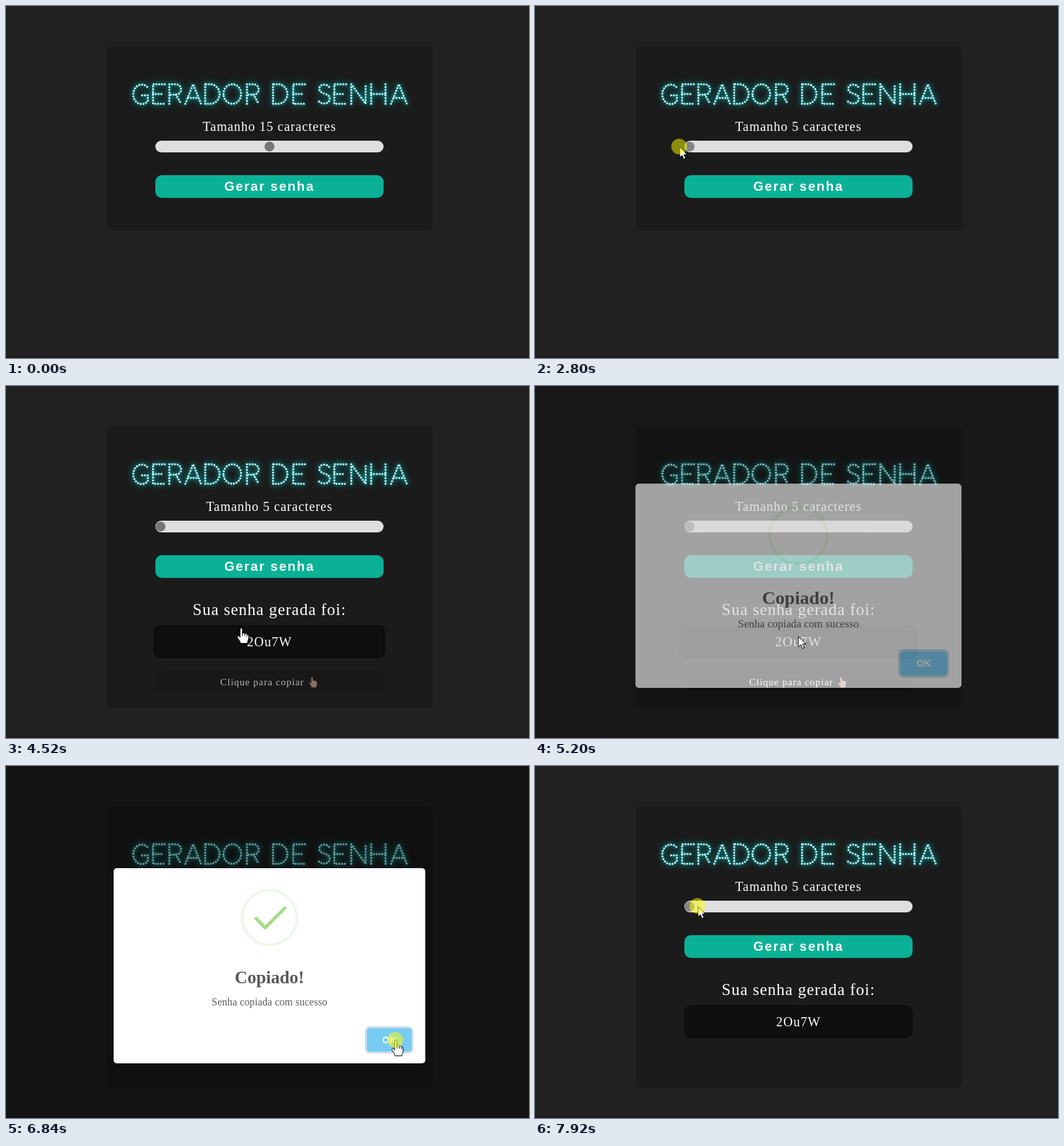
Animation, 802 px wide and 541 px high, one loop 8 s. Source, as an HTML page:

```html
<!DOCTYPE html>
<html lang="pt-BR">
<head>
<meta charset="utf-8">
<title>Gerador de senha</title>
<style>
html, body { margin: 0; width: 100%; height: 100%; overflow: hidden; background: #212121; }
svg { display: block; width: 100%; height: 100%; }
text { font-family: "Liberation Serif", "Times New Roman", serif; fill: #fff; }
.mid { text-anchor: middle; }
.ls { letter-spacing: 1px; }
.sans { font-family: "Liberation Sans", Arial, sans-serif; font-weight: bold; }
#title {
  fill: none; stroke: #d6f3f4; stroke-width: 3.1; stroke-linecap: round; stroke-dasharray: 0 4.28;
  filter: drop-shadow(0 0 1.5px #0aa) drop-shadow(0 0 4px #0aa);
}
.cursor { fill: #fff; stroke: #000; stroke-width: 1; stroke-linejoin: round; }
</style>
</head>
<body>
<svg viewBox="0 0 802 541">
  <defs>
    <path id="handShape" d="M-2 2C-2-.7 1.6-.7 1.6 2V8.5C2.5 7 5 7.3 5.2 9C6.5 7.8 8.5 8.4 8.6 10C10 9.2 11 10 11 11.5V16C11 19 9 20 9 23.5H-1.5C-1.5 20.5-4 18.5-6 14.5C-7 12-4.5 11-3.3 12.8L-2 14.5Z"/>
  </defs>

  <rect width="802" height="541" fill="#212121"/>
  <rect y="539" width="802" height="2" fill="#1c1c1c"/>
  <rect id="panel" x="154" y="62" width="500" height="283" rx="5" fill="#1b1b1b"/>
  <g id="title" role="img" aria-label="Gerador de senha"></g>
  <text id="size" class="mid ls" x="404" y="192" font-size="20"></text>
  <rect x="229" y="207" width="350" height="18" rx="9" fill="#dedede"/>
  <circle id="thumb" cy="216" r="7.6" fill="#767676"/>
  <rect x="229" y="260" width="350" height="35" rx="10" fill="#0bb196"/>
  <text class="mid sans" x="404" y="284" font-size="20" letter-spacing="2">Gerar senha</text>

  <g id="result">
    <text class="mid ls" x="404" y="352" font-size="25">Sua senha gerada foi:</text>
    <g id="box">
      <rect x="230" y="369" width="348" height="48" rx="9" fill="#0f0f0f" stroke="#0a0a0a" stroke-width="2"/>
      <text class="mid ls" x="404" y="400" font-size="20">2Ou7W</text>
    </g>
  </g>
  <rect id="tipBox" x="229" y="438" width="350" height="32" rx="9" fill="#161616"/>

  <rect id="shade" width="802" height="541" fill="#000"/>
  <g id="tip">
    <text class="ls" x="328.5" y="460" font-size="15">Clique para copiar</text>
    <use href="#handShape" transform="translate(469.5 447.5) scale(.67)" fill="#bd967f"/>
  </g>

  <g id="modal">
    <rect x="165" y="157" width="478" height="300" rx="5" fill="#fff"/>
    <g transform="translate(364 193)">
      <circle cx="40" cy="40" r="42" fill="none" stroke="#a5dc86" stroke-width="4"/>
      <path d="M0-60A60 60 0 0 0 0 60Z" transform="translate(27 53) rotate(-45)" fill="#fff"/>
      <path id="cover" d="M0-60A60 60 0 0 1 0 60Z" fill="#fff"/>
      <rect x="28" y="8" width="7" height="92" transform="rotate(-45 31.5 54)" fill="#fff"/>
      <circle cx="40" cy="40" r="42" fill="none" stroke="#a5dc86" stroke-opacity=".2" stroke-width="4"/>
      <rect id="tickShort" height="5" rx="2" fill="#a5dc86"/>
      <rect id="tickLong" height="5" rx="2" fill="#a5dc86"/>
    </g>
    <text class="mid" x="404" y="334" font-size="27" font-weight="bold" style="fill:rgba(0,0,0,.65)">Copiado!</text>
    <text class="mid" x="404" y="368" font-size="16" style="fill:rgba(0,0,0,.64)">Senha copiada com sucesso</text>
    <rect x="551.5" y="401.5" width="72" height="39" rx="6.5" fill="none" stroke="#2b72a5" stroke-opacity=".32" stroke-width="2"/>
    <rect id="ok" x="553" y="403" width="69" height="36" rx="5"/>
    <text class="mid sans" x="587.5" y="426" font-size="14">OK</text>
  </g>

  <g id="pointer">
    <path id="arrow" class="cursor" d="M0 0V16L3.7 12.6L6.2 18.5L9 17.3L6.5 11.5H11.3Z"/>
    <g id="hand" class="cursor">
      <use href="#handShape"/>
      <path d="M1.6 8V12M5.2 9V12.5M8.6 10V13" fill="none"/>
    </g>
    <circle id="press" cx="-1" cy="-1" r="12" fill="#ff0" fill-opacity=".5"/>
  </g>
</svg>

<script>
const LOOP = 8000;
const $ = id => document.getElementById(id);
const set = (id, attrs) => {
  for (const k in attrs) $(id).setAttribute(k, attrs[k]);
};
const show = (id, on) => set(id, { visibility: on ? 'visible' : 'hidden' });
const clamp = (v, a = 0, b = 1) => Math.min(b, Math.max(a, v));
const within = (t, a, b) => t >= a && t < b;

// CSS cubic-bezier easing, solved by bisection
function bezier(x1, y1, x2, y2) {
  const at = (a, b, u) => 3 * a * u * (1 - u) ** 2 + 3 * b * u * u * (1 - u) + u ** 3;
  return x => {
    if (x <= 0 || x >= 1) return clamp(x);
    let lo = 0, hi = 1;
    for (let i = 0; i < 24; i++) {
      const m = (lo + hi) / 2;
      if (at(x1, x2, m) < x) lo = m; else hi = m;
    }
    return at(y1, y2, lo);
  };
}
const ease = bezier(.25, .1, .25, 1);
const easeIn = bezier(.42, 0, 1, 1);
const easeInOut = bezier(.42, 0, .58, 1);
const fade = (t, start, dur) => ease((t - start) / dur);

// Keyframes are [position, ...values]
function track(keys, p, easing) {
  if (p <= keys[0][0]) return keys[0].slice(1);
  for (let i = 1; i < keys.length; i++) {
    const a = keys[i - 1], b = keys[i];
    if (p < b[0]) {
      const k = easing((p - a[0]) / (b[0] - a[0]));
      return a.slice(1).map((v, j) => v + (b[j + 1] - v) * k);
    }
  }
  return keys[keys.length - 1].slice(1);
}

const GLYPHS = {
  G: 'M22 4A13 15 0 1 0 23 26V17H13',
  E: 'M18 0H0V30H18M0 15H15',
  R: 'M0 30V0H10A8 8 0 0 1 10 16H0M10 16L18 30',
  A: 'M0 30L12 0L24 30M4 21H20',
  D: 'M0 0V30H8A14 15 0 0 0 8 0H0',
  O: 'M0 15A13.5 15 0 1 1 27 15A13.5 15 0 1 1 0 15',
  S: 'M17 4C13-1 2-1 2 7C2 16 18 13 18 22C18 31 5 32 0 25',
  N: 'M0 30V0L22 30V0',
  H: 'M0 0V30M22 0V30M0 15H22'
};
const STARTS = [194.5, 225.5, 250.5, 275, 305.5, 333.5, 369.5, 409.5, 440.5, 478.5, 503.5, 529.5, 560, 590.5];
$('title').innerHTML = [...'GERADORDESENHA'].map((c, i) =>
  `<path d="${GLYPHS[c]}" transform="translate(${STARTS[i]} 120.2)"/>`).join('');

const PATH = [
  [680, 770, 321], [1120, 435, 277], [1280, 435, 277], [1440, 402, 271], [1640, 402, 271],
  [2120, 404, 212], [2320, 404, 214], [2760, 222, 217], [2880, 222, 217], [3120, 330, 267],
  [3200, 350, 273], [3360, 390, 281], [4000, 390, 281], [4300, 340, 335], [4520, 361, 372],
  [4800, 404, 385], [5920, 404, 385], [6600, 598, 422], [7000, 598, 422], [7640, 243, 213],
  [7800, 243, 213], [7920, 250, 216]
];
const PRESSES = [[2280, 2880], [3400, 3520], [5060, 5160], [6800, 6960], [7840, LOOP]];
const OPEN = 5080, CLOSE = 6920, REVEAL = 3440;
const POP = [[0, 1], [.01, .5], [.45, 1.05], [.8, .95], [1, 1]];
const SPIN = [[.05, -45], [.12, -405]];
// width, left, top
const SHORT = [[.54, 0, 1, 19], [.7, 50, -8, 37], [.84, 17, 21, 48], [1, 25, 14, 46]];
const LONG = [[.65, 0, 34, 54], [.84, 55, 25, 35], [1, 47, 25, 38]];

function drawTick(id, keys, p, angle) {
  const [w, x, y] = track(keys, p, ease);
  set(id, { width: w, x, y, transform: `rotate(${angle} ${x + w / 2} ${y + 2.5})` });
}

function drawSlider(t, x) {
  const value = t < 2320 ? 15 : t < 2800 ? clamp(Math.round(5 + (x - 237) / 16.7), 5, 15) : 5;
  $('size').textContent = `Tamanho ${value} caracteres`;
  const held = within(t, 2280, 2880) || t >= 7800;
  set('thumb', { cx: 237 + (value - 5) * 16.7, fill: held ? '#848484' : '#767676' });
}

function drawResult(t) {
  show('result', t >= REVEAL);
  set('panel', { height: t < REVEAL ? 283 : 432.5 });
  const leave = 1 - fade(t, 5940, 300);
  const scale = 1 + .045 * fade(t, 4460, 300) * leave;
  set('box', { transform: `translate(404 393) scale(${scale}) translate(-404 -393)` });
  const opacity = fade(t, 4400, 300) * leave;
  set('tip', { opacity });
  set('tipBox', { opacity });
}

function drawModal(t) {
  const overlay = fade(t, OPEN, 300) * (1 - fade(t, CLOSE, 300));
  const opacity = overlay * fade(t, OPEN, 200) * (1 - fade(t, CLOSE, 200));
  const age = t - OPEN;
  const [scale] = track(POP, age / 300, ease);
  set('shade', { opacity: .4 * overlay });
  set('modal', { opacity, transform: `translate(404 307) scale(${scale}) translate(-404 -307)` });
  set('cover', { transform: `translate(30 49) rotate(${track(SPIN, age / 4250, easeIn)[0]})` });
  drawTick('tickShort', SHORT, age / 750, 45);
  drawTick('tickLong', LONG, age / 750, -45);
}

function drawPointer(t, x, y) {
  const onButton = within(x, 229, 579) && within(y, 260, 295);
  const onBox = t >= REVEAL && within(x, 229, 579) && within(y, 368, 418);
  const onOk = within(x, 553, 622) && within(y, 403, 439);
  const modal = within(t, OPEN + 40, CLOSE);
  const hand = modal ? onOk : onButton || onBox;
  set('ok', { fill: modal && onOk ? '#78cbf2' : '#7cd1f9' });
  set('pointer', { transform: `translate(${x} ${y})` });
  show('arrow', t >= 680 && !hand);
  show('hand', t >= 680 && hand);
  show('press', PRESSES.some(([a, b]) => within(t, a, b)));
}

function draw(t) {
  const [x, y] = track(PATH, t, easeInOut);
  drawSlider(t, x);
  drawResult(t);
  drawModal(t);
  drawPointer(t, x, y);
}

let start;
function tick(now) {
  start ??= now;
  draw((now - start) % LOOP);
  requestAnimationFrame(tick);
}
draw(0);
requestAnimationFrame(tick);
</script>
</body>
</html>
```
